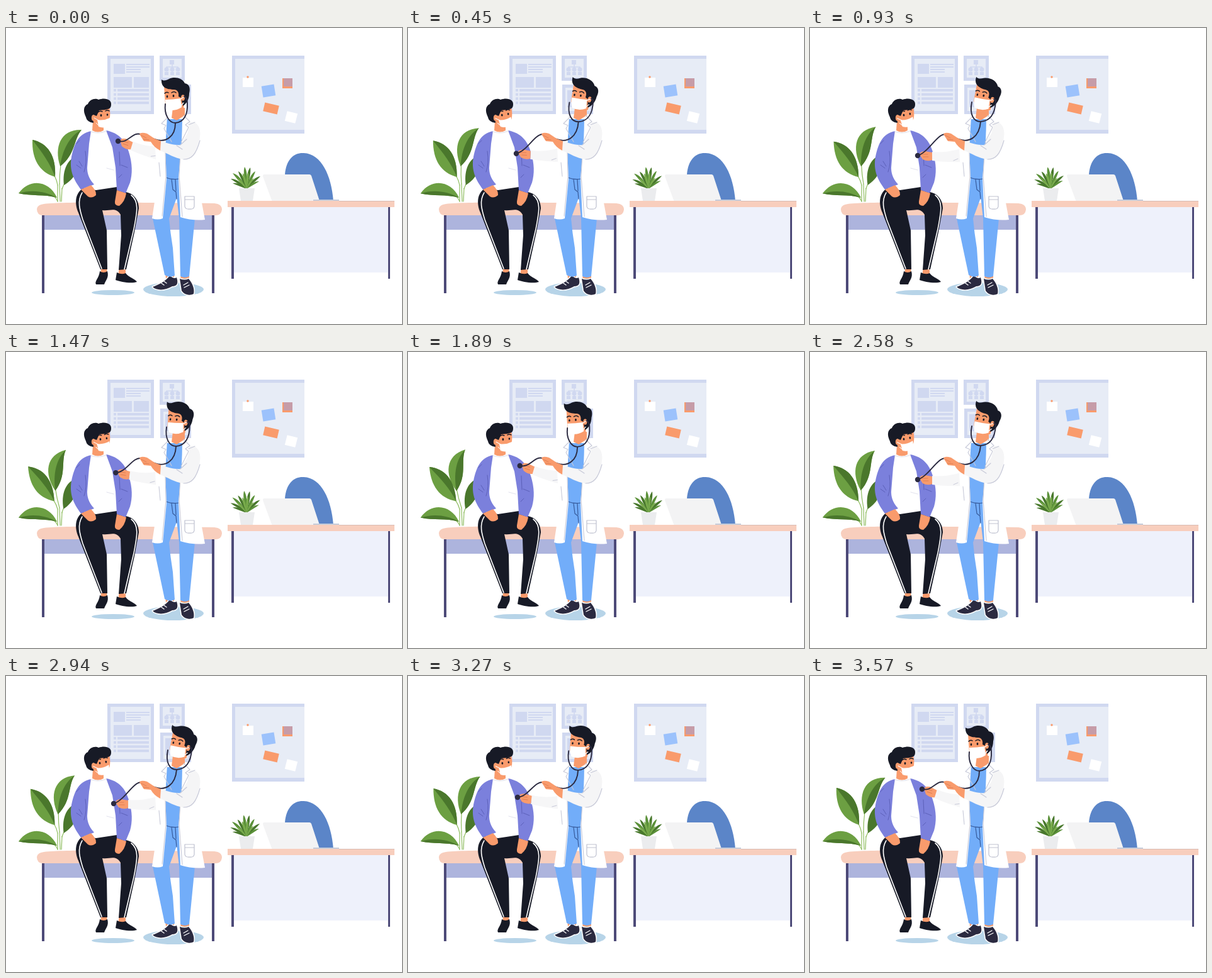
Recreate the animation shown at these times as an HTML page with a canvas. Size 629 px wide and 471 px high, loop 3.6 s.

```html
<!DOCTYPE html>
<html lang="en">
<head>
<meta charset="utf-8">
<title>Check-up</title>
<style>
html, body { margin: 0; width: 100%; height: 100%; overflow: hidden; background: #fff; }
canvas { display: block; width: 629px; height: 471px; }
</style>
</head>
<body>
<canvas id="stage" width="629" height="471"></canvas>
<script>
const ctx = document.getElementById('stage').getContext('2d');
const LOOP = 3600, STEP = 30;
const SKIN = '#f99b6c', INK = '#171a26', NAVY = '#2b2a40', BLUE = '#72adf9', SEAM = '#c7c9d8';
const JACKET = '#7b80dc', FOLD = '#5c60b9', FRAME = '#d0d8f0', PAPER = '#e7ecf6';
const LEAF = '#6c9f42', SHADE = '#4a772c', PEACH = '#f8cebd', LEG = '#4d4a78';
const cache = {};

const shape = d => cache[d] || (cache[d] = new Path2D(d));
const fill = (d, color) => { ctx.fillStyle = color; ctx.fill(shape(d)); };
const rect = (x, y, w, h, color) => { ctx.fillStyle = color; ctx.fillRect(x, y, w, h); };
const mix = (a, b, p) => a + (b - a) * p;
const smooth = x => { x = Math.min(1, Math.max(0, x)); return x * x * (3 - 2 * x); };

function stroke(path, color, width = 1) {
  ctx.strokeStyle = color;
  ctx.lineWidth = width;
  ctx.stroke(path);
}
const line = (d, color, width) => stroke(shape(d), color, width);

function oval(x, y, rx, ry, color) {
  ctx.fillStyle = color;
  ctx.beginPath();
  ctx.ellipse(x, y, rx, ry, 0, 0, Math.PI * 2);
  ctx.fill();
}

function turned(x, y, degrees, draw) {
  ctx.save();
  ctx.translate(x, y);
  ctx.rotate(degrees * Math.PI / 180);
  ctx.translate(-x, -y);
  draw();
  ctx.restore();
}

function note(x, y, w, h, angle, color) {
  turned(x, y, angle, () => rect(x - w / 2, y - h / 2, w, h, color));
}

function framed(x, y, w, h) {
  rect(x, y, w, h, FRAME);
  rect(x + 5, y + 5, w - 10, h - 10, PAPER);
}

function wall() {
  framed(161, 44, 74, 93);
  rect(171, 57, 18, 16, FRAME);
  [[57, 37], [61, 37], [65, 23], [69, 23]].forEach(([y, w]) => rect(191, y, w, 2, FRAME));
  rect(171, 78, 29, 17, FRAME);
  rect(203, 78, 24, 17, FRAME);
  for (let y = 97; y < 120; y += 6.7) {
    rect(171, y, 4, 4, FRAME);
    rect(177, y, 50, 4, FRAME);
  }

  framed(244, 44, 40, 40);
  rect(260, 51, 7, 7, FRAME);
  line('M264 58V70M255 67V62H273V67', FRAME, 1.6);
  [255, 264, 273].forEach(x => {
    oval(x, 66, 3.5, 3.5, FRAME);
    rect(x - 3, 70, 6, 5, FRAME);
  });
  framed(245, 90, 49, 47);
  rect(253, 99, 32, 27, FRAME);

  rect(359, 44, 115, 124, FRAME);
  rect(364, 49, 110, 113, PAPER);
  rect(376, 79, 17, 15, '#fff');
  oval(384, 78, 1.7, 1.7, SKIN);
  note(417, 100, 20, 18, -9, '#9cc2fc');
  rect(439, 80, 16, 16, SKIN);
  rect(441, 80, 14, 13, '#c69ca8');
  note(421, 128, 23, 14, 13, SKIN);
  note(453, 142, 17, 16, 14, '#fff');
}

function desk(sway) {
  fill('M443 234C445 207 459 198 473 199C501 200 517 235 520 275H490Z', '#5b85c8');
  fill('M410 233H482Q484 233 485 235L498 275Q498 277 495 277H425Q423 277 422 274L408 236Q408 233 410 233Z', '#f3f3f4');
  rect(488, 273, 41, 4, '#c5ccda');
  turned(382, 256, sway, () => {
    const tips = [[357, 240], [360, 231], [369, 228], [379, 221], [388, 222], [396, 228], [404, 236], [402, 244], [360, 247]];
    tips.forEach(([x, y], i) => smallLeaf(x, y, i % 2 ? '#5b9139' : '#48782c'));
    [[366, 239], [376, 231], [385, 230], [394, 239]].forEach(([x, y]) => smallLeaf(x, y, '#79ab4c'));
  });
  fill('M370 255H395L392 275Q382 277 373 275Z', '#ebecee');
  rect(352, 275, 265, 10, PEACH);
  rect(529, 275, 88, 1, '#d9bbb3');
  rect(361, 285, 247, 104, '#eef1fb');
  rect(358, 285, 4, 114, LEG);
  rect(607, 285, 3, 114, LEG);
}

function smallLeaf(x, y, color) {
  const bx = 382, by = 256, dx = x - bx, dy = y - by;
  const mx = bx + dx * .6, my = by + dy * .7, k = .13;
  ctx.fillStyle = color;
  ctx.beginPath();
  ctx.moveTo(bx, by);
  ctx.quadraticCurveTo(mx - dy * k, my + dx * k - 2, x, y);
  ctx.quadraticCurveTo(mx + dy * k, my - dx * k - 2, bx, by);
  ctx.fill();
}

function plant(sway) {
  const stem = d => line(d, '#8fbd60', 1.2);
  stem('M88 276L89 255M86 276L85 248M82 276L82 250');
  turned(89, 262, sway * 4, () => {
    stem('M89 256L92 249');
    fill('M92 250C89 226 98 207 115 203C119 223 108 241 92 250Z', SHADE);
  });
  turned(85, 248, sway * 19.5, () => {
    stem('M85 248Q85 232 87 218');
    fill('M86 220C76 189 87 161 120 162C107 177 111 201 86 220Z', LEAF);
    fill('M86 220C90 193 101 172 120 162C107 177 111 201 86 220Z', SHADE);
  });
  turned(82, 250, sway * 7, () => {
    stem('M82 250Q81 243 77 235');
    fill('M42 178C41 208 52 229 78 237C80 203 66 183 42 178Z', LEAF);
    fill('M42 178C66 183 80 203 78 237C70 215 58 199 42 178Z', SHADE);
  });
  turned(82, 272, sway * .6, () => {
    stem('M70 265Q79 268 82 276');
    fill('M20 263C38 238 69 243 81 270C60 264 41 268 20 263Z', LEAF);
    fill('M20 263C40 257 62 259 81 270C60 264 41 268 20 263Z', SHADE);
  });
}

function couch() {
  rect(58, 298, 271, 23, '#adb4dd');
  rect(57, 298, 4, 124, LEG);
  rect(327, 298, 4, 124, LEG);
  fill('M60 280C100 276 200 278 331 279Q343 280 343 289Q342 298 333 298H59Q49 298 49 288Q50 281 60 280Z', PEACH);
}

function patient(p) {
  oval(170, 421, 34, 4, '#b7d4e8');
  fill('M151 381H160L161 392L150 394ZM180 381H190L190 394L178 394Z', SKIN);
  fill('M149 387Q155 391 161 387C164 397 158 402 156 408H143C140 403 148 398 149 387Z', INK);
  fill('M176 389Q184 393 190 390C195 397 205 399 208 404C199 407 182 404 174 401Z', INK);
  fill('M135 165L160 163L181 200L178 257L128 254Z', '#fff');
  fill('M122 255C109 264 109 280 115 294L150 384H161L160 322L153 290C165 292 174 284 182 297L183 330L179 385L191 384L204 325L211 287C211 274 203 263 190 261L176 253L143 258Z', INK);
  line('M121 262C113 275 117 289 122 305L152 383M199 266C212 276 208 294 203 320L188 384', '#fff', 1.6);
  fill('M135 164C114 168 108 186 104 205C100 227 108 242 119 257L140 249C130 238 129 229 129 222L132 184Z', JACKET);
  fill('M159 163C180 167 190 180 195 197C201 216 201 232 197 246L190 263L176 258L174 222L169 190Z', JACKET);
  line('M126 196Q129 216 124 229M112 184L117 179M112 218L119 223M116 212L121 220M180 197L181 219M183 218L193 222M179 238L184 233', FOLD, 1);
  line('M160 223L171 226', '#e2e2ed', 1);
  fill('M119 257L135 250Q144 259 143 266Q136 272 130 268Z', SKIN);
  fill('M176 258L191 263Q189 276 180 283Q172 283 173 276Z', SKIN);
  fill('M138 148L155 153L155 163Q146 168 137 163Z', SKIN);
  line('M135 165Q147 169 159 164', '#e9e9ef', 1.5);

  fill('M140 130L164 126C167 139 165 149 158 156L145 156L137 146Z', SKIN);
  fill('M127 142C122 132 123 124 130 121C133 113 142 111 147 114C158 110 168 114 167 122C167 129 162 130 148 131L144 140L138 138L139 151C132 150 128 147 127 142Z', INK);
  oval(139, 143, 3.2, 4.8, SKIN);
  turned(147, 158, -6 * p, () => {
    line('M146 134Q149 131 153 133M158 132Q161 130 164 132', INK, 1.5);
    oval(151, 139, 1.4, 1.9, INK);
    oval(161, 138, 1.3, 1.8, INK);
    line('M140 143L147 147M143 151L148 156', '#fff', 1);
    fill('M145 146Q155 148 165 143L165 154Q157 161 147 157Z', '#fff');
  });
}

function shoes() {
  fill('M253 388H267V398L254 399ZM278 388H291V402H277Z', SKIN);
  const left = 'M260 394Q267 400 271 397C274 406 272 411 264 411C253 418 239 418 233 412C243 408 254 403 260 394Z';
  const right = 'M276 399Q284 402 290 399C296 406 300 415 298 423C290 427 282 423 279 418Z';
  [left, right].forEach(d => { line(d, '#fff', 3); fill(d, NAVY); });
  line('M244 404L251 409M248 401L255 406M282 409L289 405M283 413L291 409', '#fff', 1.3);
}

function farArm(p) {
  ctx.save();
  ctx.translate(4 * (1 - p), -3 * (1 - p));
  turned(240, 203, 17 * (1 - p), () => {
    fill('M194 197C214 199 229 195 246 190L248 213Q216 214 194 211Z', '#f6f6f7');
    line('M228 211L235 208', SEAM, 1);
    fill('M194 198L182 196Q172 197 175 203L179 209Q187 213 194 210Z', SKIN);
    line('M178 201L187 201M180 205L188 205', '#d9794f', .8);
  });
  ctx.restore();
}

function body(p) {
  oval(266, 416, 48, 11, '#b7d4e8');
  shoes();
  fill('M252 238H275L272 268L259 303Q261 326 265 350L268 394Q260 398 252 393L233 303Z', BLUE);
  fill('M262 240H276L300 303L291 395Q284 399 277 395L275 303L271 268Z', BLUE);
  farArm(p);
  fill('M254 145H280L278 241H252Z', BLUE);
  line('M254 238Q264 242 275 240M263 241L265 257L270 261L271 272M269 241L270 259', '#365a9a', 1.2);
  fill('M256 142L241 149L237 190L240 250L232 303Q241 306 249 303L255 240L253 190Z', '#fff');
  fill('M281 140L301 149C310 157 308 172 305 192L303 235L316 305Q296 307 277 301L274 238L279 185Z', '#fff');
  line('M277 199L275 235L280 300M253 197L254 236L248 299M243 214L245 236', SEAM, 1.1);
  line('M284 268H299V284Q298 289 292 288Q285 289 284 284ZM284 273H299', '#bfc1d0', 1.2);
  fill('M265 127H284L284 139L271 147L263 143Z', SKIN);
  line('M257 142L247 152L254 155L251 160L263 181M282 139L292 149L285 154L290 158L278 182', SEAM, 1.1);
}

function nearArm() {
  fill('M292 150C307 148 311 164 307 179C302 202 295 210 281 209C268 207 257 200 245 195L246 180C258 184 270 187 277 186L288 168Z', '#f5f5f6');
  line('M308 179C302 201 295 209 282 209M277 186L287 177M271 187L280 193M290 154L300 150', SEAM, 1.2);
  fill('M246 180L236 176L224 168Q214 165 212 169L219 180L230 181Q235 190 245 195Z', SKIN);
  line('M215 171L223 175M218 177L227 178', '#d9794f', .8);
}

function head(p) {
  turned(272, 145, 15 * p, () => {
    fill('M251 93L275 94L284 108L282 128L266 130L253 121Z', SKIN);
    fill('M247 82C251 85 255 83 259 81C267 77 280 79 284 88C292 89 293 97 291 104C291 114 286 121 281 124L278 111L274 109C275 102 272 98 267 98C256 98 246 95 247 82Z', INK);
    oval(281, 111, 3, 4.7, SKIN);
    line('M252 104Q255 101 258 103M263 103Q267 100 270 103', INK, 1.5);
    oval(256, 109, 1.3, 1.9, INK);
    oval(266, 108, 1.4, 1.9, INK);
    line('M276 114L282 110M275 127L282 119', '#fff', 1.2);
    fill('M253 114Q265 114 277 112L279 126Q269 133 257 130Q253 124 253 114Z', '#fff');
  });
}

function stethoscope(p) {
  const at = (a, b) => mix(a, b, p);
  const bend = [at(269, 271), at(151, 149)];
  const tip = [at(178, 171), at(180, 203)];
  const path = new Path2D();
  path.moveTo(at(253, 257), at(121, 118));
  path.bezierCurveTo(at(251, 253), 138, at(259, 260), at(151, 149), ...bend);
  path.bezierCurveTo(at(283, 288), at(150, 148), at(289, 294), at(137, 133), at(288, 295), at(120, 117));
  path.quadraticCurveTo(at(288, 296), at(111, 115), at(283, 292), at(109, 113));
  path.moveTo(...bend);
  path.bezierCurveTo(269, 174, 253, 183, 236, 177);
  path.lineTo(214, 169);
  path.bezierCurveTo(at(200, 201), at(165, 170), at(195, 188), at(184, 198), ...tip);
  stroke(path, NAVY, 1.9);
  oval(...tip, 4.2, 4.2, NAVY);
}

// Two examinations per loop: lean back, hold, return.
function leaning(t) {
  const u = t < 1815 ? t : t - 1815;
  return smooth(u / 590) - smooth((u - 1200) / 560);
}

function draw(t) {
  const p = leaning(t);
  const sway = Math.abs(t - LOOP / 2) / (LOOP / 2) - 1;
  ctx.lineCap = ctx.lineJoin = 'round';
  rect(0, 0, 629, 471, '#fff');
  wall();
  if (p < .25) rect(244, 86, 42, 52, '#fff');
  desk(-2.5 * p);
  plant(sway);
  couch();
  patient(p);
  body(p);
  head(p);
  stethoscope(p);
  nearArm();
}

const start = performance.now();
function tick(now) {
  const t = Math.max(0, now - start) % LOOP;
  draw(Math.floor(t / STEP) * STEP);
  requestAnimationFrame(tick);
}
draw(0);
requestAnimationFrame(tick);
</script>
</body>
</html>
```
